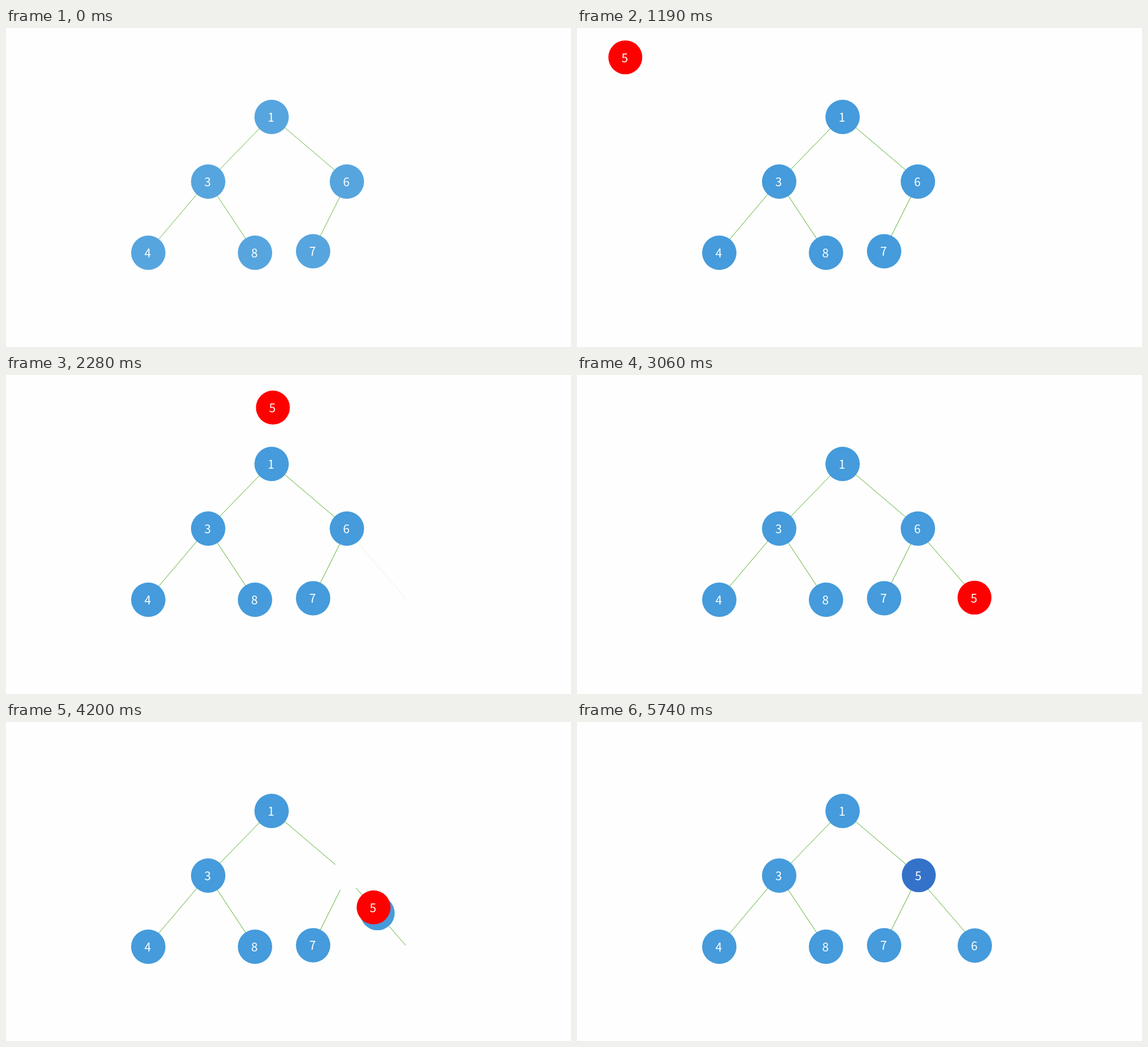
Write an HTML page that moves like this. It is 953x538 px and loops after 6490 ms.

```html
<!DOCTYPE html>
<html lang="en">
<head>
<meta charset="utf-8">
<title>Heap insertion</title>
<style>
  html, body { margin: 0; width: 100%; height: 100%; overflow: hidden; background: #fefefe; }
  svg { display: block; width: 100%; height: 100%; }
  text { font: 20px "Noto Sans CJK SC", "Noto Sans CJK JP", "Noto Sans", sans-serif; fill: #fff; text-anchor: middle; }
  line { stroke: #5bb136; stroke-width: 1; }
</style>
</head>
<body>
<svg id="stage" viewBox="0 0 953 538"></svg>
<script>
const LOOP = 6490;
const MOVE = 850;
const BLUE = [69, 155, 219], RED = [255, 0, 0], DEEP = [52, 114, 202];
const stage = document.getElementById('stage');

function add(parent, tag, attrs) {
  const el = document.createElementNS('http://www.w3.org/2000/svg', tag);
  for (const key in attrs) el.setAttribute(key, attrs[key]);
  return parent.appendChild(el);
}

const rgb = c => `rgb(${c.map(Math.round).join()})`;

function addLine(parent, x1, y1, x2, y2) {
  return add(parent, 'line', { x1, y1, x2, y2 });
}

function addNode(parent, digit, r, color, dy) {
  const g = add(parent, 'g', {});
  const disc = add(g, 'circle', { r, fill: rgb(color) });
  add(g, 'text', { x: -1, y: dy }).textContent = digit;
  return { g, disc };
}

function place(node, [x, y], scale = 1, opacity = 1) {
  node.g.setAttribute('transform', `translate(${x} ${y}) scale(${scale})`);
  node.g.setAttribute('opacity', opacity);
}

const tree = add(stage, 'g', {});
[
  [427.5, 169.5, 360, 239],
  [469, 167, 555.5, 240.5],
  [323, 279, 257, 357],
  [356, 282.5, 405, 356.5],
  [564, 283, 529.5, 352]
].forEach(p => addLine(tree, ...p));
const newLine = addLine(tree, 590.5, 280, 674, 376.5);

[
  [1, 448, 150], [3, 341, 259], [4, 240, 379], [8, 420, 379], [7, 518, 376.5]
].forEach(([digit, x, y]) => place(addNode(tree, digit, 29, BLUE, 7.5), [x, y]));

const six = addNode(tree, 6, 29, BLUE, 7.5);
const five = addNode(stage, 5, 28.6, RED, 8.3);

// Stops of the two moving nodes
const above = [81.5, -29], entry = [81.5, 49.5], top1 = [447.5, 51];
const leaf = [670.5, 375.5], parentSpot = [576.5, 258.5];
const sixUp = [575, 259], sixDown = [671, 377];

const clamp = v => Math.min(1, Math.max(0, v));
const span = (t, start, len) => clamp((t - start) / len);
const ease = u => u < 0.5 ? 2 * u * u : 1 - 2 * (1 - u) * (1 - u);
const mix = (a, b, p) => a.map((v, i) => v + (b[i] - v) * p);

function fivePos(t) {
  if (t < 1190) return mix(above, entry, span(t, 300, 850));
  if (t < 2215) return mix(entry, top1, ease(span(t, 1190, MOVE)));
  if (t < 3760) return mix(top1, leaf, ease(span(t, 2215, MOVE)));
  return mix(leaf, parentSpot, ease(span(t, 3760, MOVE)));
}

function draw(t) {
  tree.setAttribute('opacity', 0.9 + 0.1 * span(t, 90, 160));
  newLine.setAttribute('opacity', span(t, 2215, 500));

  // Pulse: grow by 5 % and turn half transparent, then return
  const u = span(t, 3130, 600);
  const bump = 1 - Math.abs(2 * u - 1);
  const scale = 1 + 0.05 * bump;
  const opacity = 1 - 0.5 * clamp(bump / 0.4);

  place(six, mix(sixUp, sixDown, ease(span(t, 3760, MOVE))), scale, opacity);
  place(five, fivePos(t), scale, opacity);
  five.disc.setAttribute('fill', rgb(mix(RED, DEEP, span(t, 4750, 900))));
}

const start = performance.now();
function tick() {
  draw((performance.now() - start) % LOOP);
  requestAnimationFrame(tick);
}
draw(0);
requestAnimationFrame(tick);
</script>
</body>
</html>
```
